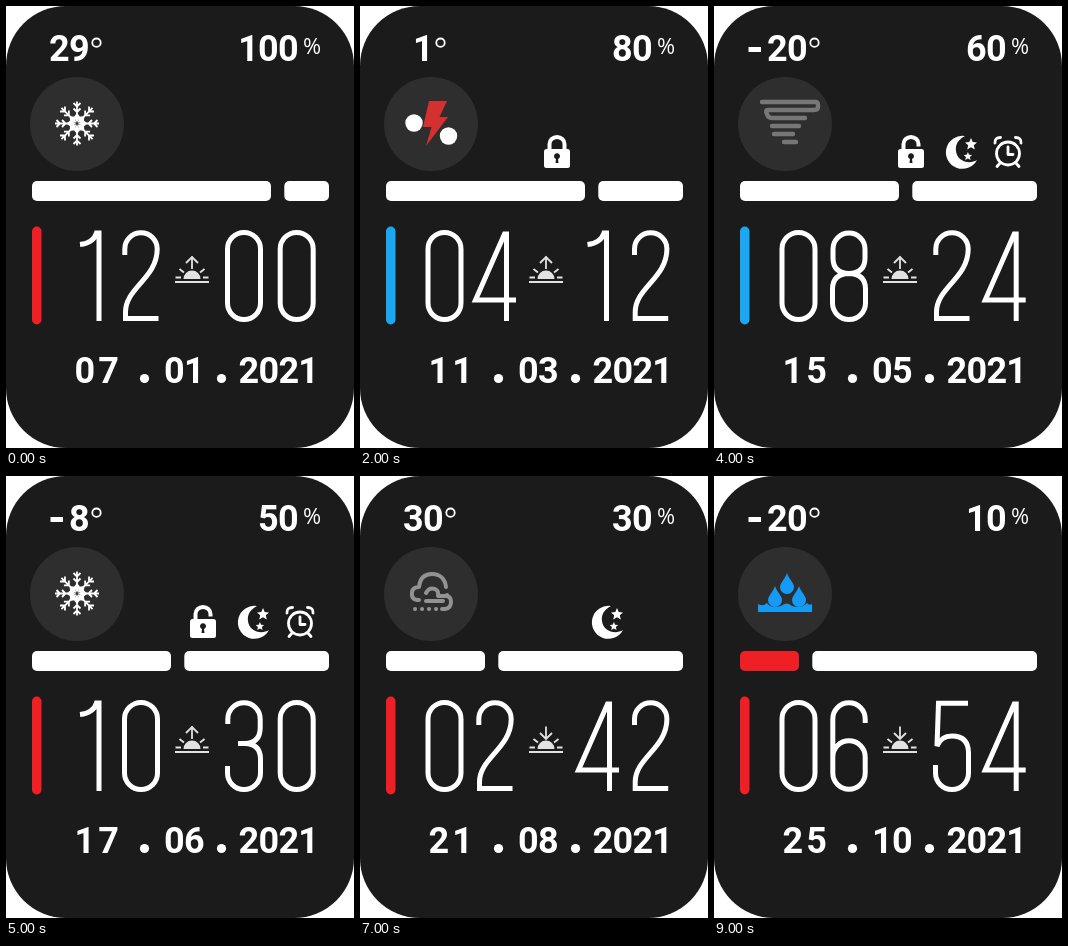
An HTML page that plays this animation: 348 px wide and 442 px high, repeating every 10000 ms.

```html
<!DOCTYPE html>
<html lang="en">
<head>
<meta charset="utf-8">
<title>Watch face</title>
<style>
  html, body { margin: 0; width: 100%; height: 100%; overflow: hidden; background: #fff; }
  svg { display: block; width: 348px; height: 442px; }
  text { font: 700 36px Roboto, "Open Sans", sans-serif; letter-spacing: -.7px; fill: #fff; }
  #percent { font: 400 22px "Open Sans", sans-serif; letter-spacing: 0; }
  #day { letter-spacing: 3px; }
  .line { fill: none; stroke: #fff; }
  .round { stroke-linecap: round; stroke-linejoin: round; }
  #time { stroke-width: 5; stroke-linejoin: miter; }
  .white { fill: #fff; }
</style>
</head>
<body>
<svg viewBox="0 0 348 442">
  <defs>
    <g id="arm">
      <path d="M0-9V-22M-3.5-20.5L0-17L3.5-20.5M-3.5-15L0-11.5L3.5-15"/>
      <path class="white" stroke="none" d="M0-1L-3.2-6.5L0-10.5L3.2-6.5Z"/>
    </g>
  </defs>
  <rect width="348" height="442" rx="60" fill="#1b1b1b"/>

  <text id="temp" y="55" text-anchor="end"></text>
  <path id="minus" class="line" stroke-width="5"/>
  <circle id="degree" class="line" cy="36.7" r="4.2" stroke-width="1.8"/>
  <text id="charge" x="292" y="55" text-anchor="end"></text>
  <text id="percent" x="297" y="47.5">%</text>

  <circle cx="71" cy="118" r="47" fill="#2e2e2e"/>
  <g id="weather">
    <g id="snow" class="line" stroke-width="1.8" transform="translate(71 117.5)"></g>
    <g id="storm">
      <circle class="white" cx="54" cy="117" r="8.7"/>
      <circle class="white" cx="88.5" cy="130" r="8.7"/>
      <path fill="#d3302f" d="M69 95H87L79.5 111H88L66 140L71.5 121H63Z"/>
    </g>
    <path id="tornado" class="line round" style="stroke:#777" stroke-width="4.4"
      d="M48 96H101Q104 96 104 99V101Q104 104 100 104H54M54 104Q51 104 53 108Q54 112 58 112H91M58 120H85M60 128H79M70 136H82"/>
    <g id="cloud" class="line round" style="stroke:#929292" stroke-width="4">
      <path d="M59 124H57Q51 123 52 116Q53 111 59 111C60 101 66 98 72 98C80 98 85 103 86 111M66 117Q69 111 75 113Q79 115 78 120H87Q91 121 91 126Q91 132 85 133H82M66 125H83"/>
      <path d="M55 133h.1M62 133h.1M69 133h.1M76 133h.1M87 119h.1"/>
    </g>
    <path id="wind" class="line round" style="stroke:#929292" stroke-width="4"
      d="M55 115.5H86Q93 115 93 109Q92.5 103 87 103Q81.5 103 81 107.5M50 123H77Q82 123.5 82 127.5Q81 131.5 76 130.5"/>
    <g id="rain" fill="#169bf5">
      <path id="drop" d="M73 97C75 103 80 107 80 111A7 7 0 0 1 66 111C66 107 71 103 73 97Z"/>
      <use href="#drop" x="-12" y="13"/>
      <use href="#drop" x="12" y="13"/>
      <path d="M44 128Q49 131 53 127Q57 133 67 130Q73 125 78 130Q88 133 93 127Q95 130 98 128V136H44Z"/>
    </g>
  </g>

  <g id="lock" class="white">
    <rect x="184" y="143" width="26" height="19" rx="2.5"/>
    <path id="shackle" class="line" stroke-width="4"/>
    <path fill="#1b1b1b" d="M196 153A3 3 0 1 1 198 153L198.5 157H195.5Z"/>
  </g>
  <g id="moon" class="white">
    <path d="M251 130A16.5 16.5 0 1 0 263 154C255 159 243 155 242 145C241 138 245 133 251 130Z"/>
    <path id="star" d="M257 132L258.7 136L263 136.4L259.8 139.3L260.8 143.5L257 141.3L253.2 143.5L254.2 139.3L251 136.4L255.3 136Z"/>
    <use href="#star" transform="translate(74 53.5) scale(.7)"/>
  </g>
  <g id="alarm" class="line round" stroke-width="2.8">
    <circle cx="294" cy="147.5" r="11.5"/>
    <path d="M294 141V148.5H299M286 157L283 160.5M302 157L305 160.5"/>
    <path d="M281 137Q280.5 131.5 286.5 131.5M307 137Q307.5 131.5 301.5 131.5"/>
  </g>

  <rect id="used" x="26" y="175" height="20" rx="5"/>
  <rect id="rest" class="white" y="175" height="20" rx="5"/>
  <rect id="side" x="26" y="220.5" width="9.5" height="98" rx="4.75"/>

  <g id="time" class="line" role="img"></g>
  <g class="line" style="stroke:#e2e2e2" stroke-width="1.8">
    <path d="M169 276H203M169.5 271.5H175M197 271.5H202.5M173.5 263L178 266.5M198.5 263L194 266.5M186 250.5V263"/>
    <path id="arrow"/>
    <path fill="#e2e2e2" stroke="none" d="M177.5 273A8.5 8.5 0 0 1 194.5 273Z"/>
  </g>

  <text id="day" x="68.5" y="376.5"></text>
  <circle class="white" cx="138.5" cy="372.5" r="4.6"/>
  <text id="month" x="158" y="376.5"></text>
  <circle class="white" cx="215.5" cy="372.5" r="4.6"/>
  <text x="232.5" y="376.5">2021</text>
</svg>
<script>
const RED = '#ee2026', BLUE = '#1ca7f2';
const SLOTS = [84.5, 135, 238, 290.7];
const GLYPHS = {
  0: 'M-16.5 243A16.5 16.5 0 0 1 16.5 243V297A16.5 16.5 0 0 1 -16.5 297Z',
  1: 'M-10.5 238.5Q3 237 6 227H8.5V315',
  2: 'M-16.2 249V243A16.2 16.2 0 0 1 16.2 243C16.2 272 -15.5 282 -15.5 306V312.5H17.5',
  3: 'M-16.2 248V243A16.2 16.2 0 0 1 16.2 243V252Q16 267 1 267.5H-6M1 267.5Q16.5 268 16.5 283V297A16.5 16.5 0 0 1 -16.5 297V290',
  4: 'M11.5 315V228H9.5L-19.5 294H21',
  5: 'M16 227.3H-13.5L-15 270Q-11 260 0 260Q16.5 260 16.5 277V297A16.5 16.5 0 0 1 -16.5 297V289',
  6: 'M16.2 247V243A16.2 16.2 0 0 0 -16.2 243V297A16.2 16.2 0 0 0 16.2 297V281A16.2 16.2 0 0 0 -16.2 281',
  8: 'M0 267.5Q-16 267 -16 252V243A16 16 0 0 1 16 243V252Q16 267 0 267.5Q16.5 268 16.5 283V297A16.5 16.5 0 0 1 -16.5 297V283Q-16.5 268 0 267.5Z'
};
// temperature, weather, status icons
const STATES = [
  [29, 'snow', ''],
  [8, 'cloud', ''],
  [1, 'storm', 'lock'],
  [-8, 'wind', 'lock moon'],
  [-20, 'tornado', 'lock moon alarm'],
  [-8, 'snow', 'lock moon alarm'],
  [20, 'rain', 'moon alarm'],
  [30, 'cloud', 'moon'],
  [1, 'wind', ''],
  [-20, 'rain', '']
];

const $ = id => document.getElementById(id);
const set = (id, name, value) => $(id).setAttribute(name, value);
const write = (id, value) => { $(id).textContent = value; };
const show = (id, on) => { $(id).style.display = on ? '' : 'none'; };
const pad = n => String(n).padStart(2, '0');

for (let a = 0; a < 360; a += 45) {
  $('snow').innerHTML += `<use href="#arm" transform="rotate(${a})"/>`;
}

function render(step) {
  const [temp, weather, icons] = STATES[step];
  const charge = 100 - step * 10;
  const digits = String(Math.abs(temp));
  const half = 10 * (digits.length + (temp < 0));

  write('temp', digits);
  set('temp', 'x', 63 + half);
  set('degree', 'cx', 63 + half + 7.5);
  set('minus', 'd', temp < 0 ? `M${64.5 - half} 43.5h12.5` : '');
  write('charge', charge);

  for (const icon of $('weather').children) show(icon.id, icon.id === weather);
  for (const id of ['lock', 'moon', 'alarm']) show(id, icons.includes(id));
  set('shackle', 'd', `M189.5 144V138A7.5 7 0 0 1 204.5 138V${step < 4 ? 144 : 140.5}`);

  const end = 65 + 2 * charge;
  set('used', 'width', end - 26);
  set('used', 'fill', charge > 10 ? '#fff' : RED);
  set('rest', 'x', end + 13.3);
  set('rest', 'width', 323 - end - 13.3);
  set('side', 'fill', step > 0 && step < 5 ? BLUE : RED);

  const clock = pad((step * 2) % 12 || 12) + pad(step * 6);
  $('time').innerHTML = [...clock].map((c, i) =>
    `<path transform="translate(${SLOTS[i]})" d="${GLYPHS[c]}"/>`).join('');
  set('time', 'aria-label', clock.slice(0, 2) + ':' + clock.slice(2));
  set('arrow', 'd', step < 6 ? 'M180 257L186 251L192 257' : 'M180 257L186 263L192 257');
  write('day', pad(7 + step * 2));
  write('month', pad(1 + step));
}

let current = -1;
function tick() {
  const step = Math.floor(performance.now() / 1000) % STATES.length;
  if (step !== current) render(current = step);
  requestAnimationFrame(tick);
}
tick();
</script>
</body>
</html>
```
